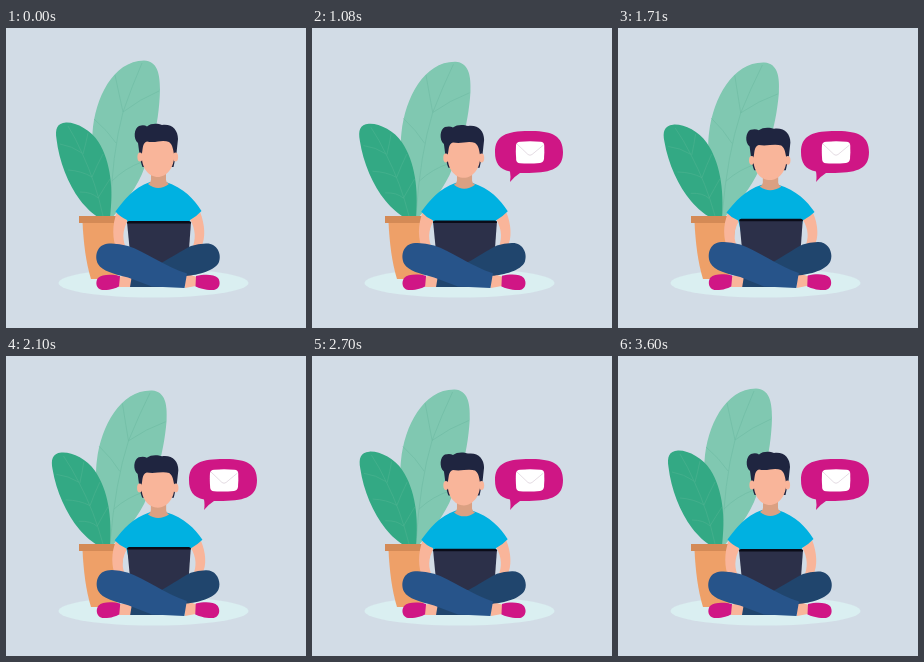
These frames come from a looping animation (300x300 px, 3.66 s). An HTML page:

```html
<!DOCTYPE html>
<html lang="en">
<head>
<meta charset="utf-8">
<title>Message received</title>
<style>
  html, body { margin: 0; width: 100%; height: 100%; overflow: hidden; background: #d2dce6; }
  svg { display: block; width: 100vw; height: 100vh; }
</style>
</head>
<body>
<svg viewBox="0 0 300 300" xmlns="http://www.w3.org/2000/svg">
  <rect width="300" height="300" fill="#d2dce6"/>
  <ellipse cx="147.500" cy="255" rx="95" ry="14.500" fill="#daeff1"/>

  <g id="bigLeaf">
    <path fill="#80c8b1" d="M104 190C92 160 84.500 125 86.500 105C89 70 107 33 138 32.500C151 33 154 45 154 62C153 100 143 130 136 146C127 166 114 180 106 190Z"/>
    <path fill="none" stroke="#6ebaa3" stroke-width=".6" d="M136 35Q126 58 117 84Q106 125 104 188M109 47Q113 66 117 84M153 63Q134 71 117 84M88 91Q101 102 110 115M136 134Q119 140 106 153"/>
  </g>
  <g id="smallLeaf">
    <path fill="#33a984" d="M104 189C107.500 162 105 134 92.500 114C85 102 70 94 60 94.500C51 95 49 101 50.500 111C53 133 62 156 74 172C80 180 87 186 92 189Z"/>
    <path fill="none" stroke="#4db391" stroke-width=".6" d="M62 98Q70 111 76 125Q90 155 97 188M54 116Q66 118 76 125M82 105Q80 115 77 126M62 142Q76 143 86 149M97 126Q91 137 86 149M74 164Q86 164 92 170M104 151Q98 160 92 170"/>
  </g>
  <path fill="#eea068" d="M76.500 194H118L111 251H85C80 235 77.500 215 76.500 194Z"/>
  <path fill="#d48a56" d="M73 188H116V195H73Z"/>

  <g id="torso">
    <path fill="#f9b59a" d="M111 184C106 196 106 212 111 222H121C116 212 116 203 122 192ZM194 184C199 196 200 211 195 219L186 221C190 211 190 202 184 191Z"/>
    <path fill="#00b1e1" d="M144 154C127 160 118 172 109.500 183.500Q114 189 121 192L125 210H181L184 192Q191 188 195.500 183C188 171 178 160 160 154Z"/>
    <path fill="#dba082" d="M142 156Q145 154.500 145 152V142H160V152Q160 154.500 163 156Q152 164 142 156Z"/>
  </g>
  <g id="head">
    <path fill="#1f2540" d="M136.500 139C134 133 133 122 132 115C127 111 128 100 133 98Q138 96.500 141 98.500C145 95 152 95.500 156 97C166 95.500 172 102 172 111L170.500 125L167.500 139Z"/>
    <ellipse cx="134" cy="129" rx="2.600" ry="4.500" fill="#f9b59a"/>
    <ellipse cx="169.500" cy="129" rx="2.600" ry="4.500" fill="#f9b59a"/>
    <path fill="#f9b59a" d="M135.800 126C137 122 136 115 141 113.500Q146 114.500 152 113.500Q159 112.500 163 114C167 117 167 122 168 126C169 140 160 149 152 149C143 149 135 140 135.800 126Z"/>
  </g>

  <g id="lower">
    <path fill="#2c3049" d="M121 194L125 235H182L185 194Z"/>
    <path fill="#0b0c18" d="M121 195.500V194.500Q121 193 123 193H183Q185 193 185 194.500V195.500Z"/>
    <path fill="#f9b59a" d="M126 246L112 249L113 259H126ZM179 245L191 249L190 258L179 260Z"/>
    <path fill="#d01685" d="M114 248C106 246 96 246 92 250C89 254 90 261 96 262C104 262.500 110 260 113 258.500ZM190 248C198 246 208 246 212 250C215 254 214 261 208 262C200 262.500 193 260 189.500 258.500Z"/>
    <path fill="#20456d" d="M200 215.500C211 215 216 226 213 234C209 243 192 247 180 248L165 259H124L126 247C150 241 172 224 185 218Q192 215.500 200 215.500Z"/>
    <path fill="#27548a" d="M103 215.500C91 216 88 228 92 236C96 243 108 246 122 249.500L146 258.500L178.500 260L181 245.500C160 239 138 223 122 218Q112 215 103 215.500Z"/>
  </g>

  <g id="bubble">
    <path fill="#cf1685" d="M217 103C240 102.500 251 108 251 124C251 140 241 144.500 217 145H208Q203 148 198 154Q199 149 198 143.500C187 141 183 135 183 124C183 108 194 103 217 103Z"/>
    <path fill="#fff" d="M208 113.700Q218 113 228.500 113.700Q232 114 232.200 117Q232.600 124 232 131Q231.500 134.500 228 135Q218 136 208 135.300Q204.500 135 204.200 132Q203.500 124 204 117Q204.500 114 208 113.700Z"/>
    <path fill="none" stroke="#d9cdd7" stroke-width=".7" d="M205 116L216 126.500Q218 128 220 126.500L231.500 117"/>
  </g>
</svg>
<script>
const LOOP = 3660, POP = 800;
const part = id => document.getElementById(id);
const move = (id, value) => part(id).setAttribute('transform', value);
const scaleAt = (x, y, sx, sy) =>
  `translate(${x} ${y}) scale(${sx} ${sy}) translate(${-x} ${-y})`;
const ease = u => 0.5 - 0.5 * Math.cos(Math.PI * Math.min(1, u));

function draw(t) {
  const sway = 0.5 - 0.5 * Math.cos(2 * Math.PI * t / LOOP);
  const slump = sway ** 3; // the body lingers upright longer than the leaves
  move('bigLeaf', `rotate(${3.2 * sway} 104 188)`);
  move('smallLeaf', `rotate(${-3.1 * sway} 98 188)`);
  move('torso', scaleAt(152, 200, 1 + 0.025 * slump, 1 - 0.06 * slump));
  move('head', `translate(0 ${3.5 * slump}) ` + scaleAt(152, 125, 1 + 0.02 * slump, 1 - 0.015 * slump));
  move('lower', scaleAt(152, 262, 1 - 0.008 * slump, 1 + 0.034 * slump));
  const s = ease(t / POP);
  move('bubble', scaleAt(198, 154, s, s));
}

const start = performance.now();
function tick() {
  draw((performance.now() - start) % LOOP);
  requestAnimationFrame(tick);
}
tick();
</script>
</body>
</html>
```
